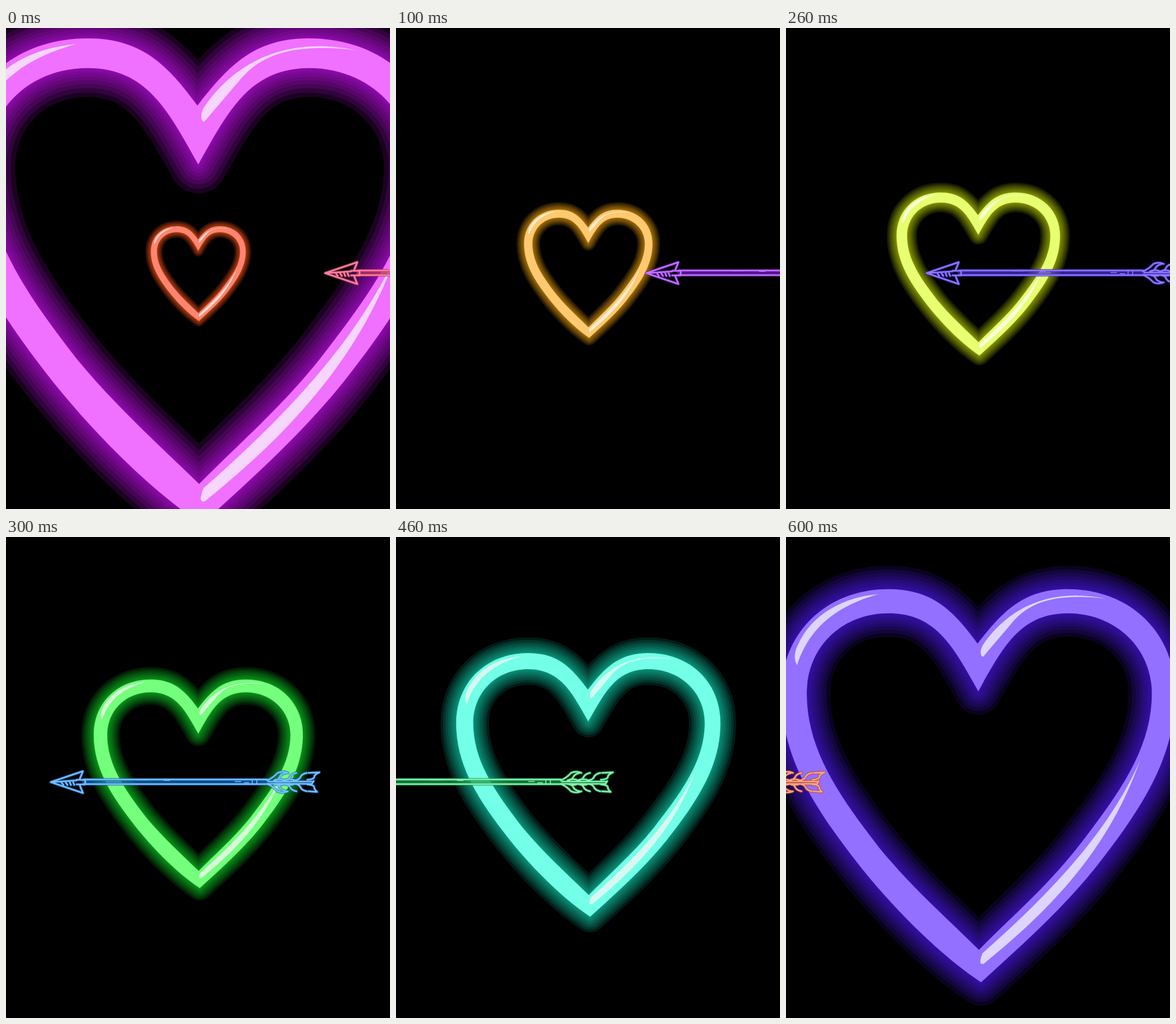
An HTML page that plays this animation: 669 px wide and 837 px high, repeating every 0.7 s.

```html
<!DOCTYPE html>
<html lang="en">
<head>
<meta charset="utf-8">
<title>Neon heart and arrow</title>
<style>
  html, body { margin: 0; width: 100%; height: 100%; overflow: hidden; background: #000; }
  svg { display: block; width: 100%; height: 100%; }
</style>
</head>
<body>
<svg viewBox="0 0 669 837" fill="none" stroke-linejoin="round" stroke-linecap="round">
  <g id="stage"></g>
</svg>
<script>
const OUTER = 'M334,228C300,182 270,149 205,149C112,149 49,215 49,300C49,395 100,470 165,553' +
  'C215,615 280,680 339,719C395,668 455,615 505,553C570,470 621,395 621,300' +
  'C621,215 558,149 465,149C400,149 370,182 334,228Z';
const INNER = 'M335,297C300,235 275,184 205,184C135,184 86,235 86,300C86,380 130,445 192,525' +
  'C240,583 290,627 336,672C380,627 432,583 478,525C540,445 587,380 587,300' +
  'C587,235 535,184 465,184C395,184 370,235 335,297Z';
const SHINE = 'M72,259C66,250 69,238 73,230C93,185 140,160 191,156C140,170 92,197 72,259Z' +
  'M342,247C337,246 338,237 341,231C375,180 435,145 521,163C440,153 405,172 383,199Q360,226 342,247Z' +
  'M341,677C440,590 525,500 570,397C533,500 472,588 343,692Q334,695 341,677Z';

const HEAD = 'M1,0L57,-19L51,-4M1,0L57,19L51,4M4,0L46,-3M20,1l3,4M27,0l3,5M34,0l2,5M40,0l2,5M46,-4h15v8h-15';
const SHAFT = 'M58,-4.5H378M58,3.5H380';
const KNOTS = 'M150,-4h20M198,-3h10M322,-1h10M338,1h8M352,-3v5M360,-3v5';

// One vane of the fletching; side is -1 above the shaft and 1 below it.
function vane(side) {
  const y = v => v * side;
  const end = side < 0 ? 469 : 465;
  let d = `M378,${y(3)}Q388,${y(7)} 396,${y(16)}`;
  for (let x = 396; x < 450; x += 18) {
    d += `q9,${y(4)} 18,0M${x + 15},${y(16)}q-9,${y(-2)} -11,${y(-7)}t-10,${y(-6)}`;
  }
  return d + `M450,${y(16)}L${end},${y(17)}Q460,${y(13)} 460,${y(9)}T448,${y(4)}`;
}
const FEATHERS = vane(-1) + vane(1) + 'M380,-1H456M380,3H456L459,-2';

// Heart: scale, vertical offset, tube, glow, shine. Arrow: tip x, line, glow.
const heart = (scale, dy, tube, glow, shine) => ({ scale, dy, tube, glow, shine });
const arrow = (x, line, glow) => ({ x, line, glow });
const STEP = 100;
const steps = [
  { hearts: [heart(1.483, -203, '#f070ff', '#b512da', '#f6d6ff'),
             heart(.289, 302, '#ff8570', '#dc4a18', '#ffdcd4')],
    arrow: arrow(555, '#ff80a4', '#b83c5c') },
  { hearts: [heart(.391, 258, '#ffc970', '#d28a10', '#ffefd6')],
    arrow: arrow(435, '#c474ff', '#7020b8') },
  { hearts: [heart(.498, 212, '#e7ff70', '#a5ba08', '#f9ffdc')],
    arrow: arrow(244, '#9078ff', '#4430c8') },
  { hearts: [heart(.637, 153, '#74ff7c', '#10b824', '#d6fbd8')],
    arrow: arrow(77, '#78c0ff', '#1c68b8') },
  { hearts: [heart(.805, 82, '#74ffe8', '#10b898', '#d8f7f1')],
    arrow: arrow(-91, '#84f5ac', '#209850') },
  { hearts: [heart(1, 0, '#73baff', '#146ccc', '#d9ebff')],
    arrow: arrow(-235, '#f2f276', '#98980c') },
  { hearts: [heart(1.2, -88, '#9370ff', '#4814d8', '#ded6ff')],
    arrow: arrow(-402, '#ffa584', '#b84c20') }
];

const GLOW_RINGS = 9, GLOW_RADIUS = 34;
const path = (d, attrs) => `<path d="${d}" ${attrs}/>`;

function drawHeart({ scale, dy, tube, glow, shine }) {
  let rings = '';
  for (let i = GLOW_RINGS; i > 0; i--) {
    const width = 2 * GLOW_RADIUS * (i / GLOW_RINGS) ** 1.5;
    rings += path(OUTER + INNER, `stroke="${glow}" stroke-opacity=".15" stroke-width="${width}"`);
  }
  return `<g transform="translate(${335 * (1 - scale)} ${dy}) scale(${scale})">` + rings +
    path(OUTER + INNER, `fill="${tube}" fill-rule="evenodd"`) +
    path(SHINE, `fill="${shine}"`) + '</g>';
}

function drawArrow({ x, line, glow }) {
  const all = HEAD + SHAFT + FEATHERS;
  return `<g transform="translate(${x} 426.5)">` +
    path(all, `stroke="${glow}" stroke-opacity=".35" stroke-width="6"`) +
    path(all, `stroke="${glow}" stroke-opacity=".7" stroke-width="4"`) +
    path('M58,-.5H380', `stroke="${glow}" stroke-opacity=".7" stroke-width="6"`) +
    path(HEAD + FEATHERS, `stroke="${line}" stroke-width="2.6"`) +
    path(SHAFT, `stroke="${line}" stroke-width="2.4"`) +
    path(KNOTS, `stroke="${line}" stroke-width="1.6"`) + '</g>';
}

const stage = document.getElementById('stage');
const pictures = steps.map(s => s.hearts.map(drawHeart).join('') + drawArrow(s.arrow));
let shown = -1;

function render(time) {
  const index = Math.floor(time / STEP) % steps.length;
  if (index !== shown) stage.innerHTML = pictures[shown = index];
}

function tick() {
  render(performance.now());
  requestAnimationFrame(tick);
}
tick();
</script>
</body>
</html>
```
